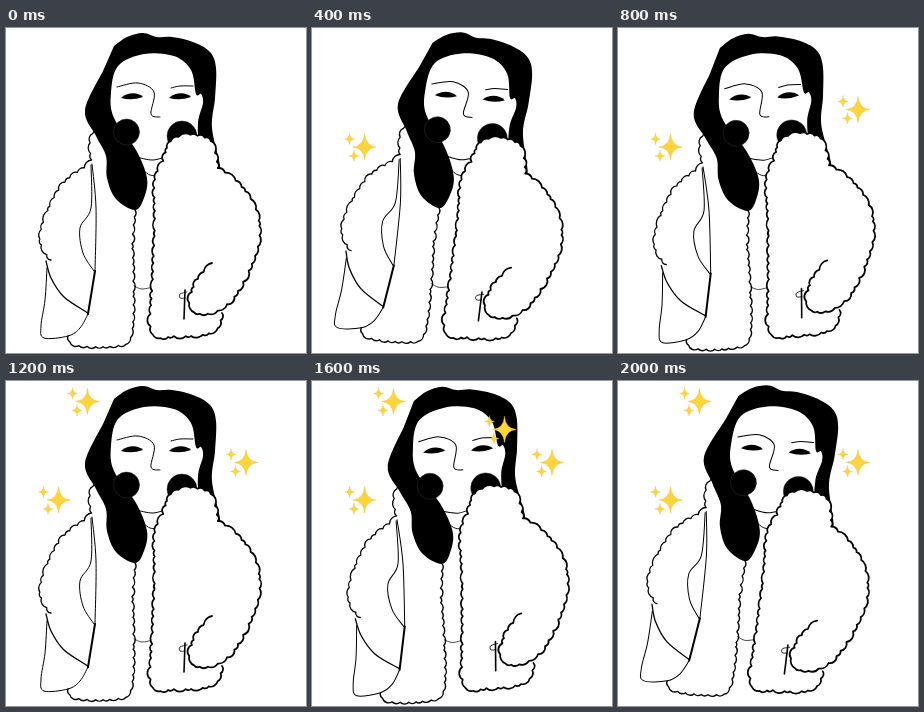
Write an HTML page that moves like this. It is 300x325 px and loops after 2.4 s.

```html
<!DOCTYPE html>
<html lang="en">
<head>
<meta charset="utf-8">
<title>Fur coat sparkle</title>
<style>
html, body { margin: 0; width: 100%; height: 100%; overflow: hidden; background: #fff; }
svg { display: block; width: 100vw; height: 100vh; }
</style>
</head>
<body>
<svg id="stage" viewBox="0 0 300 325" fill="none" stroke-linecap="round" stroke-linejoin="round">
  <g id="figure" stroke="#000"></g>
  <g id="sparkles"></g>
</svg>
<script>
const NS = 'http://www.w3.org/2000/svg';
const figure = document.getElementById('figure');
const sparkles = document.getElementById('sparkles');

function add(parent, tag, attrs) {
  const el = document.createElementNS(NS, tag);
  for (const key in attrs) el.setAttribute(key, attrs[key]);
  return parent.appendChild(el);
}

// Smooth curve through "x,y x,y ..." points.
function curve(text) {
  const p = text.split(' ').map(s => s.split(',').map(Number));
  let d = 'M' + p[0];
  for (let i = 0; i < p.length - 1; i++) {
    const [a, b, c, e] = [p[i - 1] || p[i], p[i], p[i + 1], p[i + 2] || p[i + 1]];
    const handle = (q, r, s, sign) => q.map((v, k) => (v + sign * (s[k] - r[k]) / 6).toFixed(2));
    d += 'C' + [handle(b, a, c, 1), handle(c, b, e, -1), c];
  }
  return d;
}

const line = (text, width = 1) => add(figure, 'path', { d: curve(text), 'stroke-width': width });
const blob = text => add(figure, 'path', { d: curve(text) + 'Z', fill: '#000', stroke: 'none' });

let seed = 7;
const random = () => (seed = seed * 16807 % 2147483647) / 2147483647;

// Row of uneven bumps along a curve; sweep picks the bulging side.
function fur(text, size, sweep, width, fill = 'none') {
  const guide = add(figure, 'path', { d: curve(text), stroke: 'none' });
  const total = guide.getTotalLength();
  const count = Math.round(total / size);
  let last = guide.getPointAtLength(0);
  let d = `M${last.x} ${last.y}`;
  for (let i = 1; i <= count; i++) {
    const jitter = i < count ? (random() - .5) * .6 : 0;
    const { x, y } = guide.getPointAtLength(total * (i + jitter) / count);
    const r = Math.hypot(x - last.x, y - last.y) * (.6 + random() * .25);
    d += `A${r} ${r} 0 0 ${sweep} ${x} ${y}`;
    last = { x, y };
  }
  guide.remove();
  add(figure, 'path', { d, fill, 'stroke-width': width });
}

function drawBody() {
  fur('92,102 85,108 84,122 84,135 59,154 43,180 34,208 38,222 45,232', 8.5, 0, 1.3);
  fur('129,182 126,214 127,245 125,308 107,318 69,317 62,308', 8, 1, 1.4);
  // bag and strap
  line('40,233 45,250 58,269 82,285', 1.3);
  line('41,240 39,272 35,298 38,310 62,308 74,300 82,286');
  line('86,136 90,180 89,243');
  line('85,137 85,180 74,200 77,225 88,243');
  line('89,243 82,286', 2);
  // neckline and shirt hem
  line('138,143 144,147 152,148', .9);
  line('128,258 136,261 147,259', .7);
}

function eye(x, y) {
  add(figure, 'path', {
    d: `M${x - 11} ${y}C${x - 5} ${y - 6} ${x + 6} ${y - 6} ${x + 11} ${y - 1}Q${x} ${y + 3} ${x - 11} ${y}Z`,
    fill: '#000', stroke: 'none'
  });
}

function cheek(cx, cy, r) {
  add(figure, 'circle', { cx, cy, r, fill: '#000', stroke: '#333', 'stroke-width': .5 });
}

function drawHead() {
  blob('108,18 121,9 137,5 151,9 166,9 187,14 204,24 210,40 209,70 206,100 214,141 195,118 ' +
    '192,95 197,75 195,66 190,66 185,42 168,28 138,26 112,38 105,65 108,90 ' +
    '130,122 141,150 138,170 129,182 110,171 101,150 100,128 90,108 79,82 97,43');
  cheek(120.5, 104, 13);
  cheek(176, 108, 15);
  line('111,59 132,55 148,64 145,86 154,89');
  line('165,60 174,58 187,58');
  eye(126, 70);
  eye(174, 70);
  line('130,129 147,132 161,128');
}

function drawRightCoat() {
  // collar, front edge, hem and side in one outline, sleeve on top
  fur('212,140 206,115 196,109 180,107 164,114 157,134 149,152 149,195 147,250 146,305 ' +
    '170,308 195,307 211,301 216,285', 8.5, 0, 1.7, '#fff');
  fur('212,140 232,155 250,182 252,218 232,263 216,280 200,286 185,283 183,276 190,254 206,235',
    9.5, 1, 1.8, '#fff');
  // cuff tag
  line('181,264 174,266 174,270 179,270', .8);
  line('179,262 178,291', 1.6);
}

function star(parent, x, y, r) {
  const k = r * .08;
  let d = `M0 ${-r}`;
  for (const [sx, sy] of [[1, -1], [1, 1], [-1, 1], [-1, -1]]) {
    const end = sx * sy < 0 ? [sx * r * .9, 0] : [0, sy * r];
    d += `Q${sx * k} ${sy * k} ${end}`;
  }
  add(parent, 'path', {
    d, transform: `translate(${x} ${y})`, fill: '#fdd43c', stroke: '#f2bd38', 'stroke-width': .4
  });
}

function sparkle(x, y) {
  const g = add(sparkles, 'g', { transform: `translate(${x} ${y})` });
  star(g, 0, 0, 13);
  star(g, -15, -8, 5.5);
  star(g, -10.5, 9, 5.5);
  return g;
}

drawBody();
drawHead();
drawRightCoat();

const STEP = 400;
const tilt = [0, 5, -2.5, 0, -2.5, 5];
const groups = [
  { el: sparkle(52.5, 119), from: 1, to: 5 },
  { el: sparkle(240, 81.5), from: 2, to: 5 },
  { el: sparkle(81.5, 20.5), from: 3, to: 5 },
  { el: sparkle(192.5, 48.5), from: 4, to: 4 }
];

function render(time) {
  const step = Math.floor(time / STEP) % tilt.length;
  figure.setAttribute('transform', `rotate(${tilt[step]} 150 159)`);
  for (const { el, from, to } of groups) {
    el.setAttribute('visibility', step >= from && step <= to ? 'visible' : 'hidden');
  }
}

const start = performance.now();
function tick() {
  render(performance.now() - start);
  requestAnimationFrame(tick);
}
tick();
</script>
</body>
</html>
```
